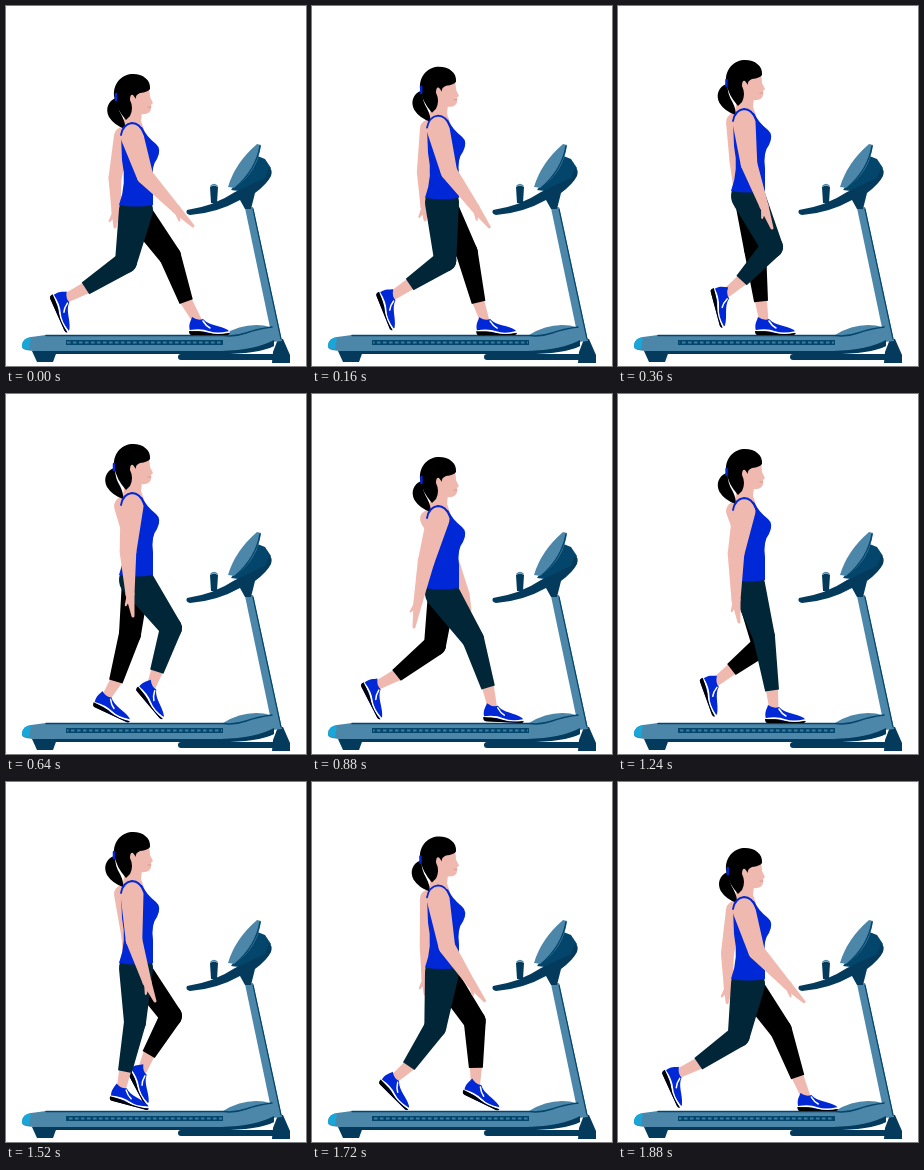
These frames come from a looping animation (300 by 360 pixels, 1920 ms). An HTML page with a canvas:

```html
<!DOCTYPE html>
<html>
<head>
<meta charset="utf-8">
<style>
html, body { margin: 0; width: 100%; height: 100%; overflow: hidden; background: #fff; }
canvas { display: block; }
</style>
</head>
<body>
<canvas id="stage" width="300" height="360"></canvas>
<script>
const ctx = document.getElementById('stage').getContext('2d');
const LOOP = 1920, HALF = LOOP / 2, STEP = 40;
const SKIN = '#f0b9af', BLUE = '#0028d6', BLACK = '#000', NAVY = '#002637';
const STEEL = '#4c87a9', DEEP = '#04456c', DARK = '#043a5c';

// time, body drop
const BOB = [[0, 18], [280, 5], [360, 4], [560, 0], [640, 0], [720, 2], [880, 13], [920, 16]];

// time, knee x y, cuff x y, heel x y, shoe angle
const LEG = [
  [0, 164, 250, 180, 295, 183, 329, 0],
  [280, 146, 243, 154, 296, 147, 329, 0],
  [360, 137, 243, 143, 295, 137, 329, 0],
  [560, 129, 240, 119, 289, 103, 318, 15],
  [640, 124, 240, 110, 287, 86, 312, 25],
  [880, 123, 251, 85, 281, 48, 290, 63],
  [960, 120, 256, 80, 282, 43, 290, 66],
  [1240, 145, 251, 114, 275, 81, 285, 70],
  [1320, 154, 241, 124, 274, 92, 283, 75],
  [1520, 165, 234, 143, 272, 120, 288, 62],
  [1600, 165, 234, 151, 277, 129, 295, 50],
  [1840, 161, 245, 176, 293, 171, 327, 3]
];

// time, elbow x y, wrist x y, fingertip x y
const NEAR_ARM = [
  [0, 139, 170, 170, 203, 187, 220],
  [360, 131, 158, 146, 200, 154, 222],
  [640, 122, 158, 124, 200, 127, 222],
  [880, 114, 168, 106, 208, 102, 233],
  [960, 112, 171, 103, 211, 99, 236],
  [1240, 118, 160, 118, 206, 121, 228],
  [1520, 128, 158, 141, 200, 149, 219]
];
const FAR_ARM = [
  [0, 109, 172, 110, 205, 109, 221],
  [360, 118, 155, 121, 190, 123, 200],
  [640, 128, 158, 135, 185, 138, 192],
  [880, 142, 172, 153, 200, 158, 216],
  [960, 144, 174, 156, 202, 161, 218],
  [1240, 130, 160, 138, 185, 140, 195],
  [1520, 122, 155, 122, 185, 122, 200]
];

// Smooth periodic interpolation through keys
function pose(keys, time, period) {
  const n = keys.length;
  const t = ((time % period) + period) % period;
  const key = i => {
    const turn = Math.floor(i / n), k = keys[i - turn * n];
    return [k[0] + turn * period, ...k.slice(1)];
  };
  let i = n - 1;
  while (keys[i][0] > t) i--;
  const [a, b, c, d] = [i - 1, i, i + 1, i + 2].map(key);
  const span = c[0] - b[0], u = (t - b[0]) / span, v = 1 - u;
  return b.slice(1).map((p, j) => {
    const q = c[j + 1];
    const m = (q - a[j + 1]) / (c[0] - a[0]) * span;
    const k = (d[j + 1] - p) / (d[0] - b[0]) * span;
    return (1 + 2 * u) * v * v * p + u * v * v * m + u * u * (3 - 2 * u) * q - u * u * v * k;
  });
}

function fill(d, color) {
  ctx.fillStyle = color;
  ctx.fill(new Path2D(d));
}

function stroke(d, color, width, cap = 'round') {
  ctx.strokeStyle = color;
  ctx.lineWidth = width;
  ctx.lineCap = cap;
  ctx.stroke(new Path2D(d));
}

// Tapered segment; a flat end has no round cap
function taper(x1, y1, r1, x2, y2, r2, color, flat) {
  const len = Math.hypot(x2 - x1, y2 - y1);
  const dir = Math.atan2(y2 - y1, x2 - x1);
  const side = Math.acos(Math.max(-1, Math.min(1, (r1 - r2) / len)));
  ctx.beginPath();
  ctx.arc(x1, y1, r1, dir + side, dir - side + 2 * Math.PI);
  if (flat) {
    for (const s of [-side, side]) ctx.lineTo(x2 + r2 * Math.cos(dir + s), y2 + r2 * Math.sin(dir + s));
  } else {
    ctx.arc(x2, y2, r2, dir - side, dir + side);
  }
  ctx.fillStyle = color;
  ctx.fill();
}

function shoe(x, y, angle) {
  ctx.save();
  ctx.translate(x, y);
  ctx.rotate(angle);
  fill('M1-4C-1-11 2-14 3-18Q9-14 14-16C20-9 31-10 39-5Q42-1 38 0H3Q0 0 1-4Z', BLUE);
  stroke('M1-4Q12-6 20-3T40-3', '#fff', 1.8);
  stroke('M14-14Q17-9 21-7', '#fff', 1.5);
  fill('M0-4Q12-4 20-2T41-2Q40 0 38 0H3Q0 0 0-4Z', BLACK);
  ctx.restore();
}

function leg(time, drop, color, hipR) {
  const [kx, ky, cx, cy, hx, hy, deg] = pose(LEG, time, LOOP);
  const angle = deg * Math.PI / 180, c = Math.cos(angle), s = Math.sin(angle);
  taper(cx, cy, 6, hx + 9 * c + 13 * s, hy + 9 * s - 13 * c, 4.5, SKIN);
  shoe(hx, hy, angle);
  taper(130, 186 + drop, hipR, kx, ky, 11, color);
  taper(kx, ky, 11, cx, cy, 7, color, true);
}

function arm(keys, time, drop, x, r) {
  const [ex, ey, wx, wy, tx, ty] = pose(keys, time, LOOP);
  const thumb = Math.atan2(ty - wy, tx - wx) + 0.5;
  taper(x, 112 + drop, r, ex, ey, r * 0.72, SKIN);
  taper(ex, ey, r * 0.72, wx, wy, 4.5, SKIN);
  taper(wx, wy, 4.5, tx, ty, 1.5, SKIN);
  taper(wx, wy, 3, wx + 12 * Math.cos(thumb), wy + 12 * Math.sin(thumb), 1, SKIN);
}

function torso() {
  fill('M119 88L136 88L135 97L139 108L116 108Z', SKIN);
  fill('M115 110Q119 101 126 101L136 103Q140 112 150 120Q156 125 151 135Q145 142 147 158V181Q130 184 113 181Q121 160 116 136Z', BLUE);
}

function head(sway) {
  fill('M124 66L143 64Q144 70 144 73L147 79L145 81L145 85Q144 91 135 90L133 96L120 98Z', SKIN);
  stroke('M142 83H145', '#d98f8a', 0.8);
  fill('M108 72C107 58 117 50 127 50C137 50 145 56 144 65Q142 68 134 69Q129 71 130 75L127 71Q124 70 124 76Q128 84 124 92L120 96Q110 85 108 72Z', BLACK);
  ctx.save();
  ctx.translate(sway, 0);
  fill('M108 74C100 77 97 85 101 93Q106 101 117 105Q118 100 114 92Q109 84 109 75Z', BLACK);
  stroke('M108 70V76', BLUE, 2.5);
  ctx.restore();
}

function treadmill(time) {
  stroke('M175 351H268', DARK, 6);
  fill('M26 345H51L47 356H31Z', DARK);
  fill('M266 357L267 346L272 333H277L284 349V357Z', DARK);
  fill('M239 202L247 201L276 335L267 336Z', STEEL);
  stroke('M247 203L275 333', DEEP, 1.2);

  fill('M16 339Q17 332 25 331L40 329H217Q233 319 250 319Q268 319 268 327V340Q252 347 215 347H40L20 344Q15 343 16 339Z', STEEL);
  fill('M16 339Q17 332 25 331L23 343Q15 343 16 339Z', '#19a6d8');
  stroke('M40 329.5H217Q229 331 240 327T266 321', DEEP, 1.5);
  fill('M28 345H215Q250 344 268 334V340Q252 348 215 348H28Z', DARK);
  stroke('M60 336.5H217', DEEP, 5, 'butt');
  ctx.save();
  ctx.setLineDash([3.5, 2.5]);
  ctx.lineDashOffset = time / 8;
  stroke('M61 336.5H216', '#3d7da3', 2, 'butt');
  ctx.restore();

  fill('M204 181Q208 178 212 181L211 197H205Z', DARK);
  stroke('M205 180Q208 177 211 180', STEEL, 1.5);
  fill('M249 149L259 153L265 162L259 176L240 186L225 184Z', DEEP);
  fill('M222 181Q229 157 251 138L255 139Q252 165 229 182Z', STEEL);
  stroke('M254 140Q250 164 229 182', DEEP, 1.5);
  fill('M181 204Q208 200 229 186L259 172L263 162Q267 163 265 170Q261 178 249 187L245 203H239L234 194Q211 207 184 209Q179 208 181 204Z', DARK);
}

function draw(now) {
  const time = Math.floor((now % LOOP) / STEP) * STEP;
  const [drop] = pose(BOB, time, HALF);
  ctx.clearRect(0, 0, 300, 360);
  treadmill(time);
  arm(FAR_ARM, time, drop, 117, 9);
  leg(time, drop, BLACK, 14);
  leg(time + HALF, drop, NAVY, 17);
  ctx.save();
  ctx.translate(0, drop);
  torso();
  head(drop / 9);
  ctx.restore();
  arm(NEAR_ARM, time, drop, 126, 11.5);
  ctx.save();
  ctx.translate(0, drop);
  stroke('M115 111Q117 100 126 99Q134 99 138 110', BLUE, 1.8);
  ctx.restore();
}

const start = performance.now();
function tick() {
  draw(performance.now() - start);
  requestAnimationFrame(tick);
}
tick();
</script>
</body>
</html>
```
